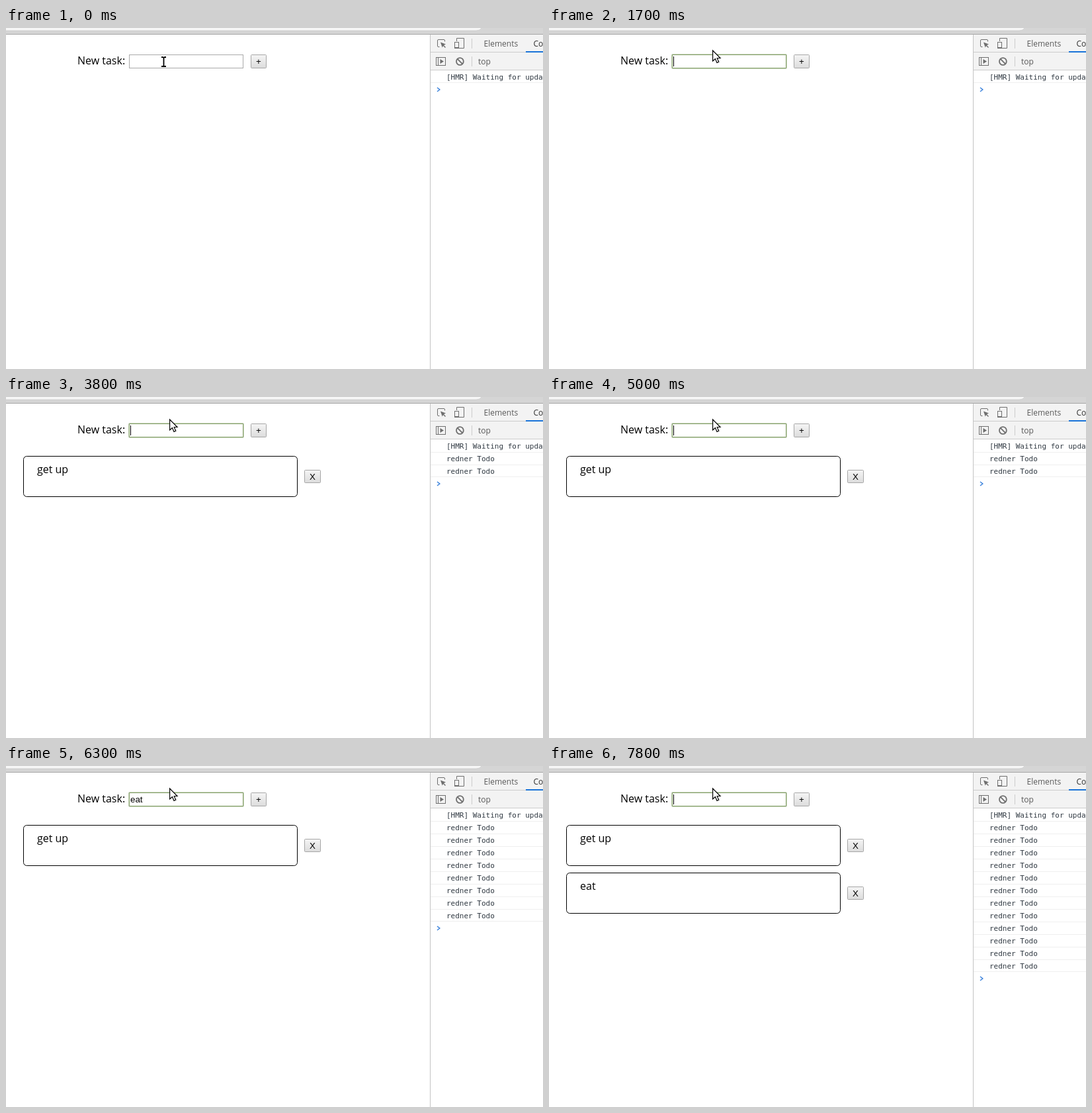
Write an HTML page that moves like this. It is 812 px wide and 515 px high and loops after 8000 ms.

```html
<!DOCTYPE html>
<html lang="en">
<head>
<meta charset="utf-8">
<title>Todo list with console</title>
<style>
  html, body { margin: 0; width: 100%; height: 100%; overflow: hidden; background: #fff; }
  svg { display: block; width: 812px; height: 515px; }
  text { white-space: pre; }
  .page { font: 16px "Open Sans", "Noto Sans", sans-serif; fill: #000; }
  .ctrl { font: 13.333px "Liberation Sans", Arial, sans-serif; fill: #000; }
  .tool { font: 12px "Open Sans", "Noto Sans", sans-serif; fill: #5a5a5a; }
  .log { font: 11px "DejaVu Sans Mono", monospace; fill: #303942; }
  .mid { text-anchor: middle; }
  .icon { fill: none; stroke: #6e6e6e; }
</style>
</head>
<body>
<svg viewBox="0 0 812 515">
  <defs>
    <linearGradient id="face" x2="0" y2="1">
      <stop offset="0" stop-color="#f5f5f5"/>
      <stop offset="1" stop-color="#dcdcdc"/>
    </linearGradient>
  </defs>
  <rect width="812" height="515" fill="#fff"/>

  <!-- browser chrome -->
  <rect width="812" height="9" fill="#d5d5d5"/>
  <path d="M0 0H719Q717 4 711 4H0Z" fill="#f6f6f6"/>
  <path d="M0 4H711Q717 4 719 0" fill="none" stroke="#c2c2c2" stroke-width=".6"/>
  <rect y="9" width="812" height="1" fill="#a6a6a6"/>

  <!-- developer tools -->
  <rect x="642" y="10" width="170" height="53" fill="#f3f3f3"/>
  <path d="M642 36.5H812M642 63.5H812M704.5 16V31M704.5 43V58" stroke="#ccc"/>
  <rect x="641" y="10" width="1" height="505" fill="#c4c4c4"/>
  <rect x="786" y="35" width="26" height="2" fill="#1a73d9"/>
  <g class="icon">
    <path d="M655.5 28.5H654Q652.5 28.5 652.5 27V19Q652.5 17.5 654 17.5H662Q663.5 17.5 663.5 19V20.5"/>
    <path d="M657 21.5L665 24.6 662 26 665 29 664 30 661 27 659.7 29.6Z" fill="#6e6e6e" stroke="none"/>
    <path d="M681.5 20V15.5H692.5V30.5H685"/>
    <rect x="678.5" y="21.5" width="6" height="9"/>
    <path d="M678 29.5H685" />
    <rect x="650.5" y="44.5" width="14" height="12"/>
    <path d="M653.5 44V57"/>
    <path d="M656.5 47L662 50.5 656.5 54Z" fill="#6e6e6e" stroke="none"/>
    <circle cx="686.4" cy="50.5" r="5.4" stroke-width="1.8"/>
    <path d="M682.6 46.7L690.2 54.3" stroke-width="1.8"/>
  </g>
  <text class="tool" x="722.5" y="28">Elements</text>
  <text class="tool" x="797.5" y="28" style="fill:#333">Console</text>
  <text class="tool" x="714" y="55">top</text>
  <text class="log" x="666" y="78">[HMR] Waiting for update signal from WDS...</text>
  <g id="logs"></g>
  <rect id="rule" x="642" width="170" height="1" fill="#efefef"/>
  <path id="prompt" d="M652 90L655.8 93 652 96" fill="none" stroke="#3b82dc" stroke-width="1.5"/>

  <!-- form -->
  <text class="page" x="108" y="55">New task:</text>
  <rect id="border" x="186.5" y="40.5" width="172" height="20" fill="#fff" stroke="#a9a9a9"/>
  <g id="ring" fill="none">
    <rect x="185.5" y="39.5" width="174" height="22" rx="1.5" stroke="#c5d3b8"/>
    <rect x="186.5" y="40.5" width="172" height="20" rx=".5" stroke="#86a16b"/>
  </g>
  <text id="typed" class="ctrl" x="188" y="55"></text>
  <rect id="caret" y="43" width="1" height="15"/>
  <g id="add"></g>
  <g id="todos"></g>

  <g id="beam">
    <path d="M-3.5 -6.5H-1.5L0 -5.5 1.5 -6.5H3.5M-3.5 7.5H-1.5L0 6.5 1.5 7.5H3.5M0 -5.5V6.5" fill="none" stroke="#fff" stroke-width="3.4"/>
    <path d="M-3.5 -6.5H-1.5L0 -5.5 1.5 -6.5H3.5M-3.5 7.5H-1.5L0 6.5 1.5 7.5H3.5M0 -5.5V6.5" fill="none" stroke="#000" stroke-width="1.8"/>
  </g>
  <path id="arrow" d="M.6 1V17L4.4 13.5 7 19.4 9.8 18.2 7.2 12.5H12Z" fill="#fff" stroke="#000" stroke-width="1.2"/>
</svg>
<script>
const LOOP = 8000;
const $ = id => document.getElementById(id);

// Each track lists [start time, value] pairs; values hold until the next one.
const typing = [[0, ""], [2100, "g"], [2200, "ge"], [2300, "get"], [2900, "get "], [3100, "get up"],
  [3800, ""], [5500, "ea"], [5700, "eat"], [6600, ""]];
const blink = [[0, 0], [600, 1], [1100, 0], [1700, 1], [4400, 0], [5000, 1],
  [6300, 0], [6600, 1], [7200, 0], [7800, 1]];
const renders = [[0, 0], [3800, 2], [5500, 6], [5700, 8], [6600, 12]];
const tasks = [[0, 0], [3800, 1], [6600, 2]];
const pointer = [[0, [238.5, 50.5]], [300, [238.5, 51.5]], [800, [239.5, 51.5]], [900, [242.5, 47.5]],
  [1000, [246, 36]], [1100, [247, 33]]];

const at = (track, t) => track.filter(([start]) => start <= t).pop()[1];
const show = (el, on) => el.setAttribute("visibility", on ? "visible" : "hidden");

const button = (x, y, w, h, label) =>
  `<rect x="${x + .5}" y="${y + .5}" width="${w - 1}" height="${h - 1}" rx="1" fill="url(#face)" stroke="#a6a6a6"/>
   <text class="ctrl mid" x="${x + w / 2}" y="${y + 15}">${label}</text>`;

const todo = (label, i) =>
  `<g transform="translate(0 ${i * 72})">
     <rect x="26.5" y="89.5" width="414" height="61" rx="5" fill="#fff" stroke="#000"/>
     <text class="page" x="47" y="115">${label}</text>${button(451, 110, 25, 20, "X")}</g>`;

const logRow = (_, i) =>
  `<g><rect x="642" y="${83 + 19 * i}" width="170" height="1" fill="#efefef"/>
   <text class="log" x="666" y="${97 + 19 * i}">redner Todo</text></g>`;

$("add").innerHTML = button(370, 40, 24, 21, "+");
$("todos").innerHTML = ["get up", "eat"].map(todo).join("");
$("logs").innerHTML = Array.from({ length: 12 }, logRow).join("");

function draw(t) {
  const text = at(typing, t);
  $("typed").textContent = text;
  const width = text ? $("typed").getComputedTextLength() : 0;
  $("caret").setAttribute("x", Math.round(188 + width));
  show($("caret"), at(blink, t));
  show($("ring"), t >= 600);

  const count = at(renders, t);
  [...$("logs").children].forEach((row, i) => show(row, i < count));
  $("rule").setAttribute("y", 82 + 19 * count);
  $("prompt").setAttribute("transform", `translate(0 ${19 * count})`);
  [...$("todos").children].forEach((box, i) => show(box, i < at(tasks, t)));

  const [x, y] = at(pointer, t);
  const inField = y > 40;
  show($("beam"), inField);
  show($("arrow"), !inField);
  $(inField ? "beam" : "arrow").setAttribute("transform", `translate(${x} ${y})`);
}

const begin = performance.now();
function tick() {
  draw((performance.now() - begin) % LOOP);
  requestAnimationFrame(tick);
}
tick();
</script>
</body>
</html>
```
